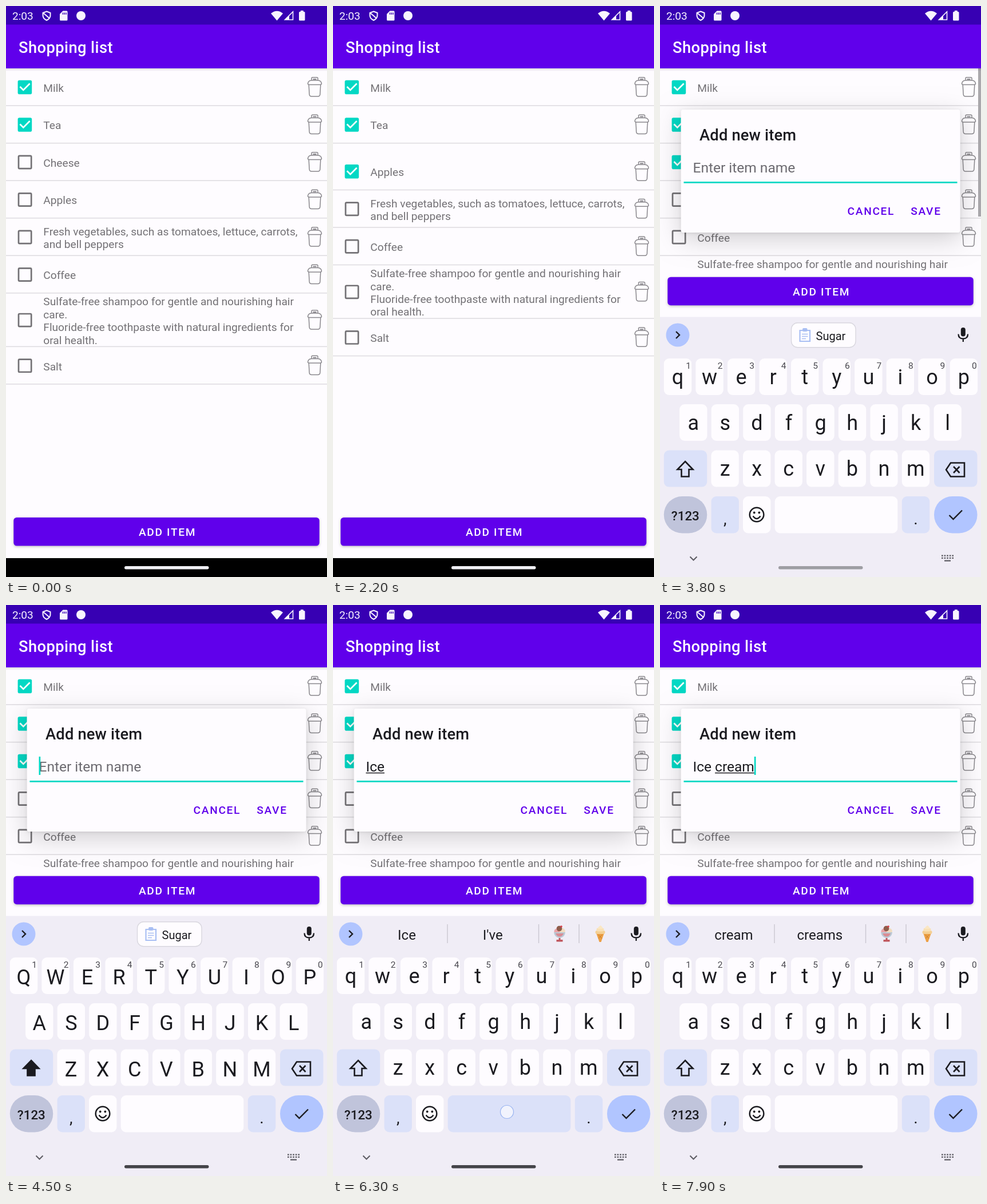
An HTML page with a canvas that plays this animation: 561 px wide and 998 px high, repeating every 8000 ms.

```html
<!DOCTYPE html>
<html lang="en">
<head>
<meta charset="utf-8">
<title>Shopping list</title>
<style>
html, body { margin: 0; width: 100%; height: 100%; overflow: hidden; background: #fefcff; }
canvas { display: block; width: 561px; height: 998px; }
</style>
</head>
<body>
<canvas id="stage"></canvas>
<script>
const W = 561, H = 998, LOOP = 8000, STEP = 100;
const PURPLE = '#6000eb', TEAL = '#03d8c4', PAPER = '#fefcff', GREY = '#737175';
const INK = '#1b1b20', KEY = '#fefcff', SOFT = '#dbe1f9', ACCENT = '#b1c5ff';

const canvas = document.getElementById('stage');
const ctx = canvas.getContext('2d');
const dpr = window.devicePixelRatio || 1;
canvas.width = W * dpr;
canvas.height = H * dpr;

// Timeline, in ms
const CHECK = 1000, REMOVE = 1913, COLLAPSE = 2033, OPEN = 2800, FOCUS = 3280;
const RESIZE = 3480, KEYS_IN = 3440, CAPS_ON = 4460, CAPS_OFF = 5260;

const entries = [
  { at: FOCUS, text: '' },
  { at: 4840, text: 'I', words: ['I', 'Ice', "I'm"] },
  { at: 5450, text: 'Ic', words: ['Ice', 'Icon', 'Ich'] },
  { at: 5780, text: 'Ice', words: ['Ice', "I've"], treats: true },
  { at: 6350, text: 'Ice ', words: ['cream', 'and'], treats: true },
  { at: 6770, text: 'Ice c', words: ['cream', 'cube'], treats: true },
  { at: 7080, text: 'Ice cr', words: ['cream', 'creams'], treats: true },
  { at: 7350, text: 'Ice cre', words: ['cream', 'creams'], treats: true },
  { at: 7660, text: 'Ice crea', words: ['cream', 'creams'], treats: true },
  { at: 7850, text: 'Ice cream', words: ['cream', 'creams'], treats: true }
];

const taps = [
  { from: 880, to: 1010, x: 34, y: 340 },
  { from: 1780, to: 1910, x: 540, y: 274 },
  { from: 2580, to: 2710, x: 284, y: 921 },
  { from: 3180, to: 3310, x: 190, y: 494 },
  { from: 4350, to: 4470, x: 42, y: 815 },
  { from: 4690, to: 4830, x: 420, y: 652, key: 'i' },
  { from: 5130, to: 5260, x: 42, y: 815 },
  { from: 5340, to: 5440, x: 225, y: 813, key: 'c' },
  { from: 5650, to: 5760, x: 142, y: 652, key: 'e' },
  { from: 6200, to: 6350, x: 304, y: 886, key: ' ' },
  { from: 6650, to: 6760, x: 225, y: 813, key: 'c' },
  { from: 6950, to: 7060, x: 197, y: 652, key: 'r' },
  { from: 7220, to: 7320, x: 142, y: 652, key: 'e' },
  { from: 7450, to: 7650, x: 58, y: 732, key: 'a' },
  { from: 7710, to: 7840, x: 447, y: 813, key: 'm' }
];

const items = [
  { lines: ['Milk'], done: () => true },
  { lines: ['Tea'], done: () => true },
  { lines: ['Cheese'], removed: true },
  { lines: ['Apples'], done: t => t >= CHECK },
  { lines: ['Fresh vegetables, such as tomatoes, lettuce, carrots,', 'and bell peppers'] },
  { lines: ['Coffee'] },
  { lines: ['Sulfate-free shampoo for gentle and nourishing hair', 'care.',
    'Fluoride-free toothpaste with natural ingredients for', 'oral health.'] },
  { lines: ['Salt'] }
];

const clamp = v => Math.max(0, Math.min(1, v));
const span = (t, from, length) => clamp((t - from) / length);
const easeBoth = p => (1 - Math.cos(Math.PI * p)) / 2;
const easeOut = p => 1 - (1 - p) ** 3;

function box(x, y, w, h, r, fill) {
  ctx.beginPath();
  ctx.roundRect(x, y, w, h, r);
  if (fill) { ctx.fillStyle = fill; ctx.fill(); }
}

function disc(x, y, r, fill) {
  ctx.beginPath();
  ctx.arc(x, y, r, 0, 7);
  ctx.fillStyle = fill;
  ctx.fill();
}

function shape(d, { fill, stroke, width = 1.5, x = 0, y = 0 }) {
  const path = new Path2D(d);
  ctx.save();
  ctx.translate(x, y);
  if (fill) { ctx.fillStyle = fill; ctx.fill(path); }
  if (stroke) {
    ctx.strokeStyle = stroke;
    ctx.lineWidth = width;
    ctx.stroke(path);
  }
  ctx.restore();
}

function label(str, x, y, size, color, { weight = 400, align = 'left', spacing = 0 } = {}) {
  ctx.font = `${weight} ${size}px Roboto, sans-serif`;
  ctx.letterSpacing = spacing + 'px';
  ctx.textAlign = align;
  ctx.fillStyle = color;
  ctx.fillText(str, x, y);
  const width = ctx.measureText(str).width;
  ctx.letterSpacing = '0px';
  return width;
}

function shadow(color, blur, dy) {
  ctx.shadowColor = color;
  ctx.shadowBlur = blur * dpr;
  ctx.shadowOffsetY = dy * dpr;
}

function drawBars() {
  ctx.fillStyle = PURPLE;
  ctx.fillRect(0, 32, W, 77);
  ctx.fillStyle = '#3700b3';
  ctx.fillRect(0, 0, W, 32.5);
  const white = '#f8f4ff';
  label('2:03', 11, 24, 19.1, white);
  shape('M71 9.5L77.5 12V16.5Q77.5 22 71 25Q64.5 22 64.5 16.5V12ZM65.5 12.5L76 21.5', { stroke: white, width: 2 });
  shape('M99.5 8.5H106Q107.5 8.5 107.5 10V24Q107.5 25.5 106 25.5H95.5Q94 25.5 94 24V14Z', { fill: white });
  shape('M99.5 11.5V15M102.3 11.5V15M105 11.5V15', { stroke: '#3700b3', width: 1.4 });
  disc(131, 17, 8, white);
  shape('M463 13Q473.5 4.5 484 13L473.5 25.5Z', { fill: white });
  shape('M501.5 10V24H487.5Z', { stroke: white, width: 1.6 });
  shape('M495 17V24H487.5Z', { fill: white });
  box(512, 10, 10.5, 15.5, 1.5, white);
  box(514.8, 8, 5, 3, 0.5, white);
  label('Shopping list', 22, 81.5, 27.27, '#fff', { weight: 500, spacing: 0.43 });
}

function drawCheckbox(y, done) {
  if (!done) {
    box(22, y - 11, 22.2, 22.2, 1.6);
    ctx.strokeStyle = GREY;
    ctx.lineWidth = 2.7;
    ctx.stroke();
    return;
  }
  box(20.6, y - 12.3, 24.6, 24.6, 2.8, TEAL);
  shape('M-8.6-1L-2.7 4.9L8.6-6.4', { stroke: '#fff', width: 2.7, x: 33, y });
}

function drawBin(y) {
  const d = 'M-5.5-12V-15.5Q-5.5-17.3-3.7-17.3H3.7Q5.5-17.3 5.5-15.5V-12' +
    'M-12-6.5Q-11-11.7-6-12H6Q11-11.7 12-6.5Q12-4.5 9.5-4.5H-9.5Q-12-4.5-12-6.5Z' +
    'M-10.3-4.5L-9.4 12Q-9.2 16-5.5 16H5.5Q9.2 16 9.4 12L10.3-4.5';
  shape(d, { stroke: '#89878c', x: 539.5, y });
  shape('M-3-14H3', { stroke: '#89878c', width: 2, x: 539.5, y });
}

function drawList(t, resized) {
  ctx.save();
  ctx.beginPath();
  ctx.rect(0, 109, W, (resized ? 462 : 884) - 109);
  ctx.clip();
  const collapse = easeBoth(span(t, COLLAPSE, 250));
  let top = 109.2;
  for (const { lines, done, removed } of items) {
    const n = lines.length, height = n > 2 ? 93.6 : 65.5, mid = top + height / 2;
    ctx.globalAlpha = removed ? 1 - span(t, REMOVE, 120) : 1;
    drawCheckbox(mid, done && done(t));
    lines.forEach((line, i) => label(line, 65.3, mid + 8 - (n - 1) * 11.2 + i * 22.4, 19.17, GREY));
    drawBin(mid);
    ctx.fillStyle = '#dfdde1';
    ctx.fillRect(0, top + height - 1.3, W, 1.6);
    top += removed ? height * (1 - collapse) : height;
  }
  ctx.globalAlpha = 1;
  if (resized) {
    ctx.globalAlpha = 1 - span(t, 4000, 250);
    ctx.fillStyle = '#aaa8ac';
    ctx.fillRect(556, 109, 5, 259);
  }
  ctx.restore();
  const shade = ctx.createLinearGradient(0, 109, 0, 114);
  shade.addColorStop(0, 'rgba(0,0,0,.12)');
  shade.addColorStop(1, 'rgba(0,0,0,0)');
  ctx.fillStyle = shade;
  ctx.fillRect(0, 109, W, 5);
}

function drawAddButton(t, resized) {
  const y = resized ? 473.7 : 894;
  ctx.save();
  shadow('rgba(0,0,0,.24)', 4, 1.5);
  box(13.3, y, 534.4, 49.5, 5.4, PURPLE);
  ctx.restore();
  if (t >= 2600 && t < 2900) box(13.3, y, 534.4, 49.5, 5.4, 'rgba(255,255,255,.12)');
  label('ADD ITEM', 282, y + 32.2, 19.09, '#fff', { weight: 500, align: 'center', spacing: 1.7 });
}

function currentEntry(t) {
  return entries.filter(e => e.at <= t).pop();
}

function drawField(t) {
  const entry = currentEntry(t), x = 57.5, base = 501, size = 24.5;
  if (!entry || !entry.text) label('Enter item name', x, base, size, '#6c6a70');
  shape(entry ? 'M41.5 518.4H519.5' : 'M41.5 517.5H519.5',
    { stroke: entry ? TEAL : '#79777c', width: entry ? 2.7 : 1.4 });
  if (!entry) return;
  const { text, at } = entry;
  const width = text ? label(text, x, base, size, INK) : 0;
  const start = text.lastIndexOf(' ') + 1;
  if (start < text.length) {
    const lead = ctx.measureText(text.slice(0, start)).width;
    ctx.fillRect(x + lead, base + 1.8, width - lead, 1.5);
  }
  if ((t - at) % 1000 < 500) {
    ctx.fillStyle = TEAL;
    ctx.fillRect(x + width, 475, 2.7, 32);
  }
}

function drawDialog(t) {
  const enter = easeOut(span(t, OPEN, 160));
  if (!enter) return;
  const scale = 0.9 + 0.1 * enter, lift = easeOut(span(t, RESIZE, 220));
  ctx.save();
  ctx.globalAlpha = enter;
  ctx.translate(280.5, 498.5 - 210 * lift);
  ctx.scale(scale, scale);
  ctx.translate(-280.5, -498.5);
  ctx.save();
  // The light sits above the screen, so the shadow shortens as the card rises
  shadow(`rgba(0,0,0,${0.25 - 0.07 * lift})`, 44, 20 - 9 * lift);
  box(36.7, 391, 487.8, 215, 4, PAPER);
  shadow('rgba(0,0,0,.1)', 4, 1);
  box(36.7, 391, 487.8, 215, 4, PAPER);
  ctx.restore();
  label('Add new item', 69, 444.7, 27.27, INK, { weight: 500, spacing: 0.18 });
  drawField(t);
  label('CANCEL', 327.6, 575, 19.09, PURPLE, { weight: 500, spacing: 1.7 });
  label('SAVE', 438.2, 575, 19.09, PURPLE, { weight: 500, spacing: 1.7 });
  ctx.restore();
}

function drawTreats() {
  // Sundae
  disc(391.5, 570.5, 5, '#e9a3a8');
  disc(400.8, 570, 5, '#f0dcc0');
  disc(395.5, 565.5, 4.8, '#8f5c4b');
  disc(399, 562, 1.8, '#d8404a');
  shape('M386 572H406Q405 581 396 582Q387 581 386 572Z', { fill: '#b9c9d6' });
  shape('M389 574H403Q401 579.5 396 579.5Q391 579.5 389 574Z', { fill: '#d98c93' });
  shape('M394.5 582H397.5V585H401.5V588.5H390.5V585H394.5Z', { fill: '#c0585f' });
  // Cone
  shape('M460 573.5H474L468.5 589H465.5Z', { fill: '#eda044' });
  shape('M463.5 576L470 583M470.5 576L464 583', { stroke: '#c97f30', width: 1 });
  box(458.5, 569, 17, 6, 3, '#f4cf93');
  box(460.5, 564.5, 13, 6, 3, '#f9e0b4');
  shape('M462.5 566Q463 562.5 468 560Q471.5 563 471.5 566Z', { fill: '#fae7c4' });
}

function drawSuggestions(t) {
  disc(31, 575, 20.5, ACCENT);
  shape('M28 569L34 575L28 581', { stroke: INK, width: 2.4 });
  box(525.8, 562, 8, 15.5, 4, INK);
  shape('M521.5 573.5Q521.5 581.5 529.8 581.5Q538 581.5 538 573.5M529.8 581.5V587', { stroke: INK, width: 2.3 });

  const { words, treats } = currentEntry(t);
  if (!words) {
    box(229.5, 553.7, 112.5, 43, 11, KEY);
    ctx.strokeStyle = '#d9d7df';
    ctx.lineWidth = 1.4;
    ctx.stroke();
    shape('M244.5 567H262V586H244.5Z', { stroke: '#a9bff3', width: 2.2 });
    box(249, 563, 8.5, 6, 2, '#a9bff3');
    shape('M248 573.5H258.5M248 577.5H258.5M248 581.5H255', { stroke: '#a9bff3', width: 1.6 });
    label('Sugar', 272.5, 583.5, 20, INK);
    return;
  }
  words.forEach((word, i) => label(word, 129 + i * 150.3, 585, 24, INK, { align: 'center' }));
  shape('M200 558V591M359.5 558V591' + (treats ? 'M430 558V591' : ''), { stroke: '#c9c7d0', width: 1.4 });
  if (treats) drawTreats();
}

function drawLetters(caps, pressed) {
  const rows = [['qwertyuiop', 31, 648], ['asdfghjkl', 58.3, 728], ['zxcvbnm', 113.6, 808.6]];
  const glyph = ch => caps ? ch.toUpperCase() : ch;
  const drop = caps ? 15 : 12.5;
  let popup;
  rows.forEach(([keys, first, y], row) => [...keys].forEach((ch, i) => {
    const x = first + i * 55.55;
    box(x - 24.2, y - 32, 48.4, 64, 9, pressed === ch ? SOFT : KEY);
    label(glyph(ch), x, y + drop, 36, INK, { align: 'center' });
    if (!row) label((i + 1) % 10, x + 18.5, y - 14.5, 15.5, '#47464d', { align: 'center' });
    if (pressed === ch) popup = { ch, x, y: y - 74 };
  }));
  return () => {
    if (!popup) return;
    ctx.save();
    shadow('rgba(0,0,0,.2)', 4, 1);
    box(popup.x - 28, popup.y - 34, 56, 68, 12, SOFT);
    ctx.restore();
    label(glyph(popup.ch), popup.x, popup.y + drop, 38, INK, { align: 'center' });
  };
}

function drawFunctionKeys(caps, pressed) {
  box(6.8, 776.6, 75.4, 64, 9, SOFT);
  shape('M44 796L57.5 810H50.5V822.5H37.5V810H30.5Z', { stroke: INK, width: 2.6, fill: caps ? INK : null });
  box(479, 776.6, 75.5, 64, 9, SOFT);
  shape('M508 798.5H532V822.5H508L500 810.5Z', { stroke: INK, width: 2.6 });
  shape('M513 805L523.5 816M523.5 805L513 816', { stroke: INK, width: 2.6 });

  box(6.8, 857, 75.4, 64.5, 32, '#c0c4db');
  label('?123', 44.3, 898.5, 22.3, INK, { weight: 500, align: 'center' });
  box(89.5, 857, 48.4, 64.5, 9, SOFT);
  label(',', 113.7, 906, 28, INK, { align: 'center' });
  box(145, 857, 48.4, 64.5, 9, KEY);
  ctx.beginPath();
  ctx.arc(169, 889, 12.3, 0, 7);
  ctx.strokeStyle = INK;
  ctx.lineWidth = 2.5;
  ctx.stroke();
  disc(164.7, 885.5, 1.9, INK);
  disc(173.3, 885.5, 1.9, INK);
  shape('M162.5 891.5Q169 900.5 175.5 891.5', { stroke: INK, width: 2.3 });
  box(200.7, 857, 214.6, 64.5, 9, pressed === ' ' ? SOFT : KEY);
  box(422.8, 857, 48.4, 64.5, 9, SOFT);
  label('.', 447, 906, 28, INK, { align: 'center' });
  box(479, 857, 75.5, 64.5, 32, ACCENT);
  shape('M505.5 890L512.5 897L528 881.5', { stroke: INK, width: 2.4 });

  shape('M52.5 962.5L58.5 968.5L64.5 962.5', { stroke: '#5d5c63', width: 2 });
  ctx.fillStyle = '#5d5c63';
  for (let i = 0; i < 10; i++) {
    ctx.fillRect(492 + (i % 5) * 4.6, 959.5 + (i / 5 | 0) * 4.2, 2.6, 2.4);
  }
  ctx.fillRect(497, 968.5, 11, 2.2);
}

function drawKeyboard(t, pressed) {
  const shown = easeOut(span(t, KEYS_IN, 300));
  if (!shown) return;
  const caps = t >= CAPS_ON && t < CAPS_OFF;
  ctx.save();
  ctx.translate(0, 455 * (1 - shown));
  ctx.fillStyle = '#f0edf6';
  ctx.fillRect(0, 543.5, W, 455);
  drawSuggestions(t);
  const drawPopup = drawLetters(caps, pressed);
  drawFunctionKeys(caps, pressed);
  drawPopup();
  ctx.restore();
}

function drawHomeBar(t) {
  const dark = span(t, 3600, 420);
  const level = Math.round(240 - 172 * dark);
  box(207, 979, 147.5, 5.4, 2.7, `rgb(${level},${level},${level + 5})`);
}

function drawTouch({ x, y }) {
  disc(x, y, 11.5, 'rgba(255,255,255,.6)');
  ctx.strokeStyle = 'rgba(110,150,235,.65)';
  ctx.lineWidth = 1.2;
  ctx.stroke();
}

function draw(t) {
  ctx.setTransform(dpr, 0, 0, dpr, 0, 0);
  ctx.fillStyle = PAPER;
  ctx.fillRect(0, 0, W, H);
  const resized = t >= RESIZE;
  const tap = taps.find(p => t >= p.from && t < p.to);
  drawList(t, resized);
  drawBars();
  drawAddButton(t, resized);
  ctx.fillStyle = '#000';
  ctx.fillRect(0, 965, W, 33);
  drawDialog(t);
  drawKeyboard(t, tap && tap.key);
  drawHomeBar(t);
  if (tap) drawTouch(tap);
}

const started = performance.now();
function tick() {
  const t = (performance.now() - started) % LOOP;
  draw(Math.floor(t / STEP) * STEP);
  requestAnimationFrame(tick);
}
tick();
</script>
</body>
</html>
```
